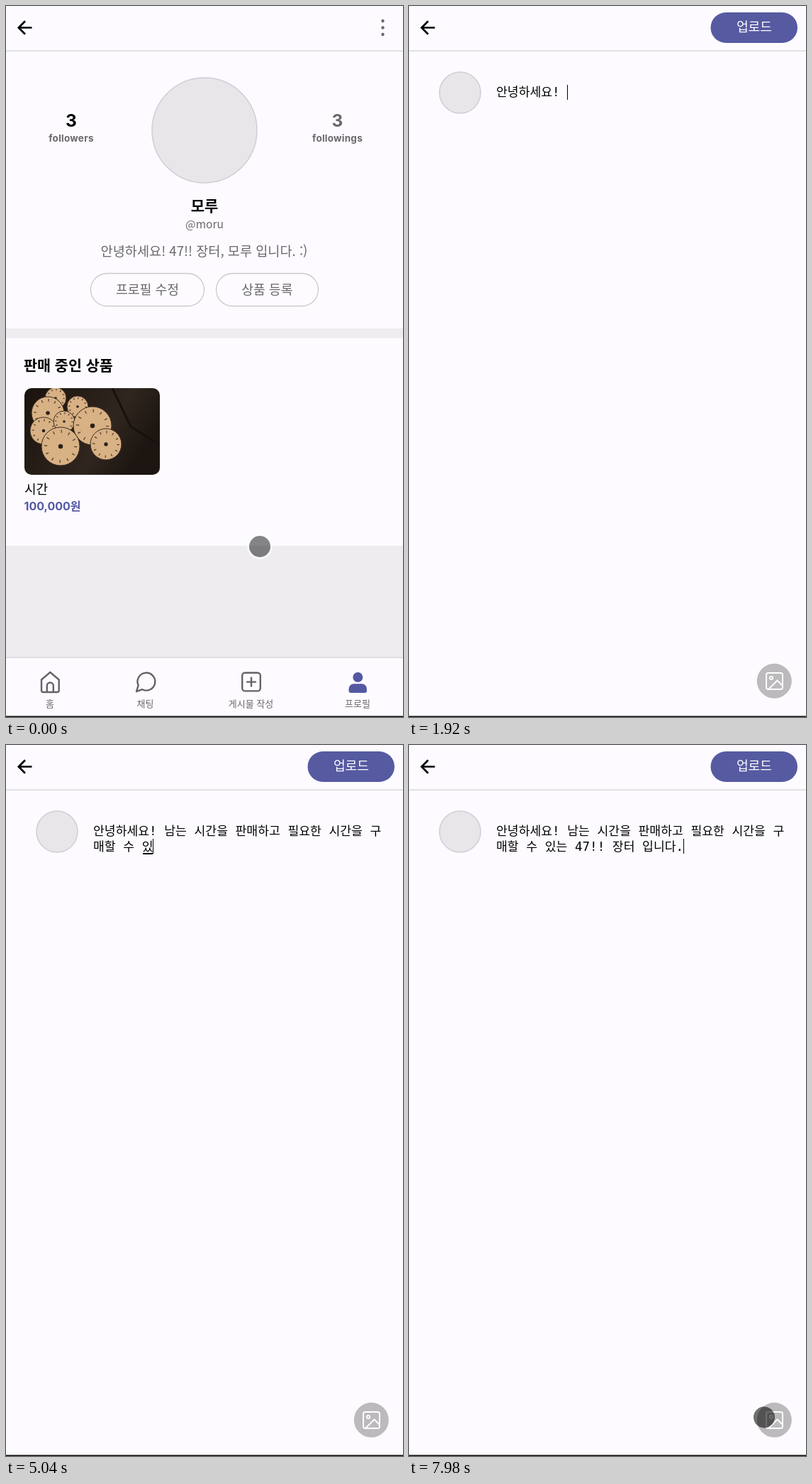
An HTML page that plays this animation: 560x1001 px, repeating every 8000 ms.

```html
<!DOCTYPE html>
<html lang="ko">
<head>
<meta charset="utf-8">
<title>프로필과 글쓰기</title>
<style>
  html, body { margin: 0; width: 100%; height: 100%; overflow: hidden; background: #fdfbff; }
  body { position: relative; font-family: "Noto Sans CJK KR", "Noto Sans CJK", sans-serif; font-weight: 500; }
  svg { position: absolute; left: 0; top: 0; width: 560px; height: 1001px; }
  .mid { text-anchor: middle; }
  .bold { font-weight: 700; }
  .latin { font-family: Inter, "Noto Sans CJK KR", "Noto Sans CJK", sans-serif; }
  .grey { fill: #6a686c; }
  .line { fill: none; stroke: #656367; stroke-width: 2.4; stroke-linecap: round; stroke-linejoin: round; }
  .pill { fill: none; stroke: #cbcacd; stroke-width: 1.3; }
  .avatar { fill: #e8e6e8; stroke: #cfced8; stroke-width: 1.5; }
  #typed {
    position: absolute; left: 123px; top: 109px; white-space: pre;
    font-size: 17.2px; line-height: 21.5px; color: #000;
  }
  #typed i { font: 17.6px/0 "DejaVu Sans Mono", monospace; }
  #typed u { position: relative; text-decoration: none; }
  #typed u::after {
    content: ""; position: absolute; left: 1px; right: 0; bottom: 0; height: 2px; background: #000;
  }
  #typed s { display: inline-block; position: relative; width: 0; }
  #typed s::after {
    content: ""; position: absolute; left: 0; bottom: -4.5px; width: 1px; height: 21px; background: #000;
  }
</style>
</head>
<body>
<svg viewBox="0 0 560 1001">
  <defs>
    <clipPath id="photoClip"><rect x="26" y="538" width="191" height="122" rx="10"/></clipPath>
    <linearGradient id="leather" x2="1" y2=".4">
      <stop offset="0" stop-color="#1a120d"/><stop offset=".7" stop-color="#30261f"/>
      <stop offset="1" stop-color="#1c1511"/>
    </linearGradient>
  </defs>
  <rect width="560" height="1001" fill="#fdfbff"/>
  <rect y="62.5" width="560" height="1.6" fill="#dbdadc"/>
  <path d="M36.5 30.5H18M27 21.3 17.8 30.5 27 39.7" fill="none" stroke="#000" stroke-width="2.7"/>

  <g id="profile">
    <g class="grey">
      <circle cx="531.5" cy="21" r="2.2"/><circle cx="531.5" cy="30.5" r="2.2"/><circle cx="531.5" cy="40" r="2.2"/>
    </g>
    <circle class="avatar" cx="280" cy="175" r="74"/>
    <g class="mid bold latin">
      <text x="92" y="169.5" font-size="24.5">3</text>
      <text x="467.5" y="169.5" font-size="24.5" class="grey">3</text>
      <g class="grey" font-size="13.5" letter-spacing=".25">
        <text x="92" y="190.5">followers</text>
        <text x="467.5" y="190.5">followings</text>
      </g>
    </g>
    <text x="280" y="289" font-size="21" class="mid bold">모루</text>
    <g class="mid grey">
      <text x="280" y="313" font-size="15.5">@moru</text>
      <text x="279.5" y="351.5" font-size="18.6">안녕하세요! 47!! 장터, 모루 입니다. :)</text>
      <text x="199.5" y="406" font-size="18.3">프로필 수정</text>
      <text x="368.5" y="406" font-size="18.3">상품 등록</text>
    </g>
    <rect class="pill" x="119.5" y="376.5" width="160" height="46" rx="23"/>
    <rect class="pill" x="296.5" y="376.5" width="144" height="46" rx="23"/>
    <g fill="#eeecef">
      <rect y="454" width="560" height="13.5"/>
      <rect y="760" width="560" height="157"/>
    </g>
    <text x="25" y="513.5" font-size="20.7" class="bold">판매 중인 상품</text>
    <g id="photo" clip-path="url(#photoClip)">
      <rect x="26" y="538" width="191" height="122" fill="url(#leather)"/>
      <path d="M150 538 176 592 217 618" fill="none" stroke="#17110d" stroke-width="3"/>
    </g>
    <text x="26" y="687" font-size="18">시간</text>
    <text x="25.5" y="710" font-size="16" class="bold latin" fill="#5458a2">100,000원</text>

    <rect y="916.5" width="560" height="1.5" fill="#d9d8da"/>
    <g class="line">
      <path d="M50 948.5 62.3 938 74.7 948.5V963.5Q74.7 966 72.2 966H52.5Q50 966 50 963.5ZM57.8 966V957a4.5 4.5 0 0 1 9 0V966"/>
      <path d="M184 965 186.7 956.4A12.4 12.4 0 1 1 192.3 962.2Z"/>
      <rect x="333.2" y="938.8" width="25.6" height="25.6" rx="4"/>
      <path d="M340 951.6H352M346 945.6V957.6"/>
    </g>
    <g fill="#5458a2">
      <circle cx="496.3" cy="945" r="7"/>
      <path d="M483.5 964V962Q484 954.5 491 954.3H501.5Q508.5 954.5 509 962V964Q509 967 506 967H486.5Q483.5 967 483.5 964Z"/>
    </g>
    <g class="mid grey" font-size="13">
      <text x="62" y="986.5">홈</text>
      <text x="196.5" y="986.5">채팅</text>
      <text x="345.5" y="986.5">게시물 작성</text>
      <text x="496" y="986.5">프로필</text>
    </g>
  </g>

  <g id="compose">
    <rect id="upload" x="425.5" y="9" width="122.5" height="43" rx="21.5"/>
    <text x="487" y="36" font-size="18.2" class="mid" fill="#fff">업로드</text>
    <circle class="avatar" cx="72" cy="122" r="29"/>
    <circle cx="515.3" cy="950.3" r="24.5" fill="#bcbabd"/>
    <g class="line" style="stroke:#fff;stroke-width:1.9">
      <rect x="504" y="939" width="23" height="23" rx="2.8"/>
      <circle cx="511" cy="946" r="2.1"/>
      <path d="M507.5 961.5 519.5 949.5 527 957"/>
    </g>
  </g>
  <rect y="999.5" width="560" height="1.5" fill="#111"/>
</svg>

<div id="typed"></div>

<svg viewBox="0 0 560 1001">
  <g id="pointer">
    <circle id="halo" r="16.5" fill="none" stroke="#fff" stroke-opacity=".6" stroke-width="3"/>
    <circle id="disc" r="15"/>
  </g>
</svg>

<script>
const LOOP = 8000, STEP = 60;
const OPEN = 360, FOCUS = 660, TYPE = 1140, DONE = 6960, REAPPEAR = 7200, PRESS = 7920, BLINK = 250;
const MESSAGE = "안녕하세요! 남는 시간을 판매하고 필요한 시간을 구\n매할 수 있는 47!! 장터 입니다.";
const LEADS = "ㄱㄲㄴㄷㄸㄹㅁㅂㅃㅅㅆㅇㅈㅉㅊㅋㅌㅍㅎ";
const TAILS = " ㄱㄲㄳㄴㄵㄶㄷㄹㄺㄻㄼㄽㄾㄿㅀㅁㅂㅄㅅㅆㅇㅈㅊㅋㅌㅍㅎ";
const SYLLABLE = 0xac00;

// [time, keystrokes made]
const KEYS = [[1140, 1], [2880, 31], [4260, 59], [5220, 76], [5340, 76], [5400, 77],
  [5520, 79], [5700, 79], [5940, 81], [6000, 81], [6900, 95]];
// [time, x, y]
const PATH = [[0, 358, 761], [300, 345, 955], [400, 345, 955], [720, 300, 171],
  [REAPPEAR - STEP, 300, 171], [7965, 501, 946.5]];
// [x, y, radius]
const DIALS = [[70, 552, 15], [59, 573, 23], [101, 564, 15], [53, 598, 19], [82, 585, 15],
  [122, 591, 27], [77, 620, 27], [141, 617, 22]];

const el = id => document.getElementById(id);
const show = (id, on) => { el(id).style.display = on ? "" : "none"; };

// Every state of the text field, one per key, as an input method composes it.
function composeStates(message) {
  const states = [["", ""]];
  let done = "", open = "";
  for (const ch of message) {
    const code = ch.charCodeAt(0) - SYLLABLE;
    if (code < 0) {
      done += open + ch;
      open = "";
      if (ch !== "\n") states.push([done, ""]);
      continue;
    }
    const lead = LEADS[Math.floor(code / 588)], tail = code % 28;
    const prev = open ? open.charCodeAt(0) - SYLLABLE : -1;
    if (prev >= 0 && prev % 28 === 0 && TAILS.includes(lead)) {
      states.push([done, String.fromCharCode(SYLLABLE + prev + TAILS.indexOf(lead))]);
      done += open;
    } else {
      done += open;
      states.push([done, lead]);
    }
    states.push([done, String.fromCharCode(SYLLABLE + code - tail)]);
    if (tail) states.push([done, ch]);
    open = ch;
  }
  return states;
}

function sample(table, t, ease = k => k) {
  const next = table.findIndex(row => row[0] > t);
  if (next === 0) return table[0].slice(1).map(() => 0);
  if (next < 0) return table[table.length - 1].slice(1);
  const a = table[next - 1], b = table[next];
  const k = ease((t - a[0]) / (b[0] - a[0]));
  return a.slice(1).map((v, i) => v + (b[i + 1] - v) * k);
}

const smooth = k => k * k * (3 - 2 * k);
const states = composeStates(MESSAGE);

el("photo").innerHTML += DIALS.map(([x, y, r]) => `<g transform="translate(${x} ${y})">
  <circle r="${r}" fill="#d8b184" stroke="#3a2a1d"/>
  <circle r="${r * .78}" fill="none" stroke="#4a382a" stroke-width="${r * .16}"
    stroke-dasharray="1.2 ${r * .78 * Math.PI / 6 - 1.2}"/>
  <circle r="${r * .12}" fill="#2b221c"/></g>`).join("");

function caretVisible(t) {
  if (t < FOCUS) return false;
  if (t < TYPE) return t < FOCUS + BLINK - 10;
  return t < DONE || Math.floor((t - DONE) / BLINK) % 2 === 0;
}

function draw(now) {
  const t = Math.floor(now % LOOP / STEP) * STEP;
  const writing = t >= OPEN;
  const count = Math.floor(sample(KEYS, t)[0] + 1e-6);
  const [done, open] = states[Math.min(count, states.length - 1)];

  show("profile", !writing);
  show("compose", writing);
  el("upload").setAttribute("fill", count > 1 ? "#565aa1" : "#c7c8e0");
  el("typed").innerHTML = writing
    ? done.replace(/[^가-힣\n]+/g, "<i>$&</i>") + (open && `<u>${open}</u>`) + (caretVisible(t) ? "<s></s>" : "")
    : "";

  const [x, y] = sample(PATH, t, smooth);
  const pressed = t > PRESS;
  show("pointer", t < TYPE || t >= REAPPEAR);
  show("halo", !pressed);
  el("pointer").setAttribute("transform", `translate(${x} ${y})`);
  el("disc").setAttribute("fill-opacity", pressed ? .56 : .48);
}

function tick() {
  draw(performance.now());
  requestAnimationFrame(tick);
}
tick();
</script>
</body>
</html>
```
